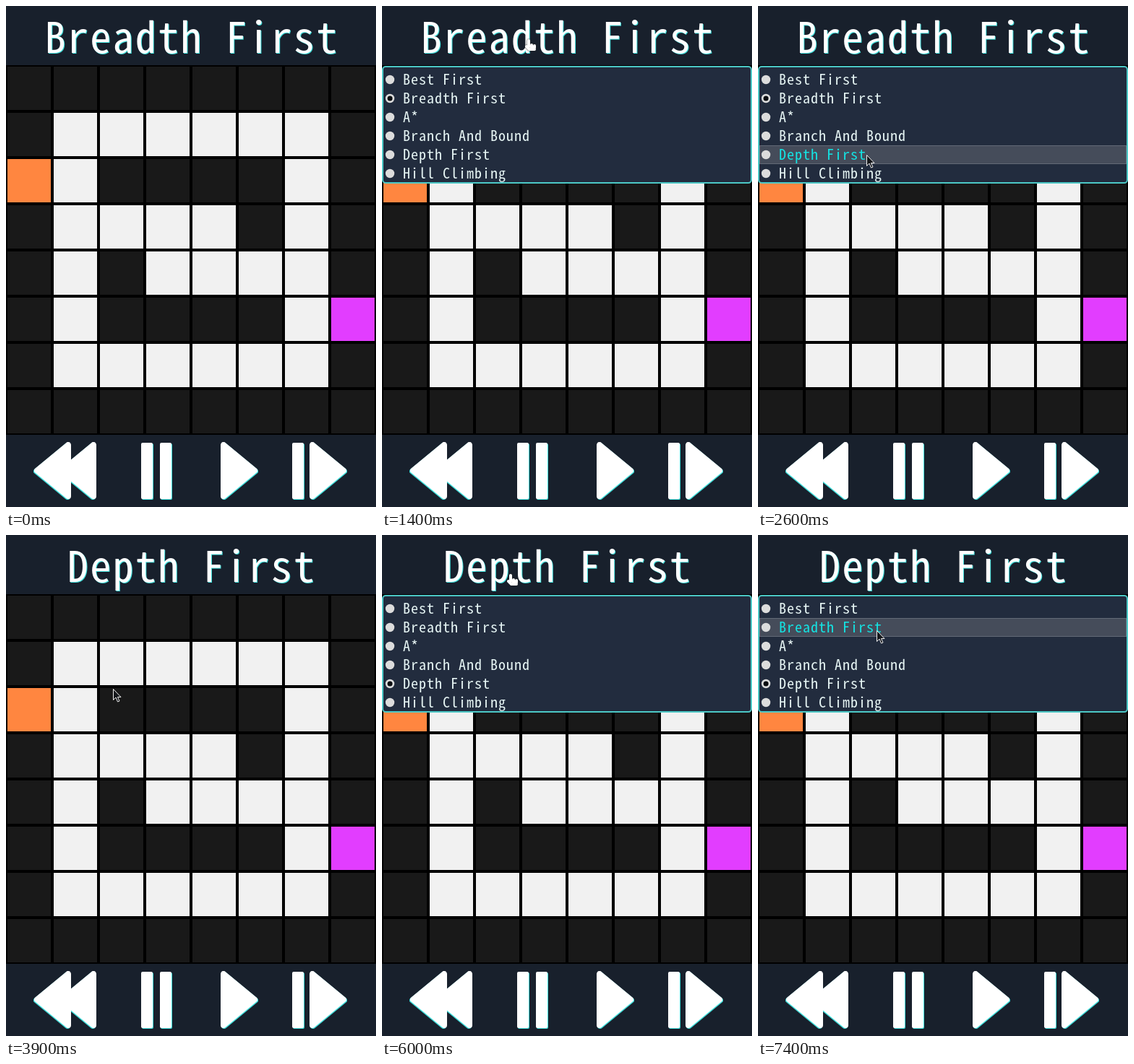
Recreate the animation shown at these times as an HTML page. Size 512 by 694 pixels, loop 8 s.

```html
<!DOCTYPE html>
<html lang="en">
<head>
<meta charset="utf-8">
<title>Path search</title>
<style>
  html, body { margin: 0; width: 100%; height: 100%; overflow: hidden; background: #18202c; }
  svg { display: block; }
  text {
    font-family: "Noto Sans Mono CJK JP", "Noto Sans Mono", monospace;
    white-space: pre;
  }
  /* fixed character pitch */
  #title { font-size: 58px; letter-spacing: calc(31.3px - 1ch); fill: #fff; }
  .row text { font-size: 20px; letter-spacing: calc(11px - 1ch); fill: #e6f5f4; }
  .glow { filter: drop-shadow(1.5px 1.5px 0 #3fe0dc); }
  .bar { fill: none; }
  .hover .bar { fill: #454c5a; stroke: #626a77; }
  .hover text { fill: #14e3e3; }
  .mark { visibility: hidden; }
  .on .mark { visibility: inherit; }
  #controls { fill: #fff; stroke: #fff; stroke-linejoin: round; }
  #tri { stroke-width: 8; }
  #post { stroke-width: 4; }
  #arrow { fill: #16181c; stroke: #eee; }
  #hand {
    fill: none; stroke: #fff; stroke-width: 4; stroke-linecap: round; stroke-linejoin: round;
    filter: drop-shadow(0 0 1px #222);
  }
</style>
</head>
<body>
<svg width="512" height="694" viewBox="0 0 512 694">
  <defs>
    <path id="tri" d="M4 608V679L47 643.5Z"/>
    <path id="post" d="M2 607V681H14V607Z"/>
  </defs>
  <rect width="512" height="694" fill="#18202c"/>
  <text id="title" class="glow" y="65"></text>
  <rect y="82" width="512" height="512"/>
  <g id="grid"></g>
  <g id="controls">
    <use href="#tri" class="glow" transform="translate(125) scale(-1 1)"/>
    <use href="#tri" class="glow" transform="translate(90) scale(-1 1)"/>
    <use href="#post" class="glow" x="187"/>
    <use href="#post" class="glow" x="213"/>
    <use href="#tri" class="glow" x="297"/>
    <use href="#post" class="glow" x="396"/>
    <use href="#tri" class="glow" x="420"/>
  </g>
  <g id="menu">
    <rect x="1" y="84" width="510" height="161" rx="4" fill="#222c3e" stroke="#4cc8c6" stroke-width="2"/>
  </g>
  <g id="cursor">
    <path id="arrow" d="M.5 .5V15.5L4 12L6.5 18L9 17L6.5 11.5H11Z"/>
    <path id="hand" d="M0 2V11M4 8V12M8 9V12M-3 10L1 14H8"/>
  </g>
</svg>
<script>
const LOOP = 8000, STEP = 100, CELL = 64, ROW = 26, PITCH = 31.3;
const BREADTH = 1, DEPTH = 4;
const names = ["Best First", "Breadth First", "A*", "Branch And Bound", "Depth First", "Hill Climbing"];
const maze = [
  "########",
  "#      #",
  "S #### #",
  "#    # #",
  "# #    #",
  "# #### G",
  "#      #",
  "########"
];
const tint = { "#": "#191919", " ": "#f1f1f1", S: "#ff8640", G: "#e23dff" };

// pointer glides: each one eases from the previous stop to x, y
const entry = { at: 300, x: 21, y: 237 };
const glides = [
  { at: 300, dur: 700, x: 203, y: 46 },
  { at: 1600, dur: 400, x: 182, y: 221 },
  { at: 2000, dur: 300, x: 177, y: 130 },
  { at: 2400, dur: 200, x: 150, y: 206 },
  { at: 2600, dur: 400, x: 148, y: 213 },
  { at: 5200, dur: 800, x: 178, y: 54 },
  { at: 6100, dur: 500, x: 105, y: 221 },
  { at: 6600, dur: 400, x: 34, y: 118 },
  { at: 7000, dur: 400, x: 164, y: 132 }
];

const $ = id => document.getElementById(id);
const ease = k => k * k * (3 - 2 * k);
const mix = (a, b, k) => Math.round(a + (b - a) * k);

function add(parent, tag, attrs) {
  const el = document.createElementNS("http://www.w3.org/2000/svg", tag);
  for (const key in attrs) el.setAttribute(key, attrs[key]);
  return parent.appendChild(el);
}

function show(el, on) {
  el.setAttribute("visibility", on ? "visible" : "hidden");
}

maze.forEach((line, r) => [...line].forEach((cell, c) =>
  add($("grid"), "rect", { x: c * CELL + 2, y: r * CELL + 84, width: 60, height: 60, fill: tint[cell] })));

const rows = names.map((name, i) => {
  const row = add($("menu"), "g", { class: "row", transform: `translate(0 ${102 + i * ROW})` });
  add(row, "rect", { class: "bar", x: 2.5, y: -12.5, width: 507, height: 25 });
  add(row, "circle", { cx: 11, r: 6.2, fill: "#dcdcdc" });
  add(row, "circle", { cx: 11, r: 3.5, fill: "#0b0d10", class: "mark" });
  add(row, "text", { x: 29, y: 7 }).textContent = name;
  return row;
});

function pointer(t) {
  let { x, y } = entry;
  for (const g of glides) {
    const k = ease(Math.min(1, Math.max(0, (t - g.at) / g.dur)));
    x = mix(x, g.x, k);
    y = mix(y, g.y, k);
  }
  return { x, y };
}

function draw(t) {
  const chosen = t < 3400 ? BREADTH : DEPTH;
  const open = (t >= 1400 && t < 3400) || t >= 6000;
  const shown = t >= entry.at;
  const { x, y } = pointer(t);
  const hovered = Math.floor((y - 89) / ROW);
  const title = names[chosen];

  $("title").textContent = title;
  $("title").setAttribute("x", 257 - title.length * PITCH / 2);
  show($("menu"), open);
  rows.forEach((row, i) => {
    row.classList.toggle("on", i === chosen);
    row.classList.toggle("hover", i === hovered);
  });
  $("cursor").setAttribute("transform", `translate(${x} ${y})`);
  show($("arrow"), shown && y >= 82);
  show($("hand"), shown && y < 82);
}

const start = performance.now();
let last = -1;
function tick() {
  const t = Math.floor((performance.now() - start) % LOOP / STEP) * STEP;
  if (t !== last) draw(last = t);
  requestAnimationFrame(tick);
}
tick();
</script>
</body>
</html>
```
